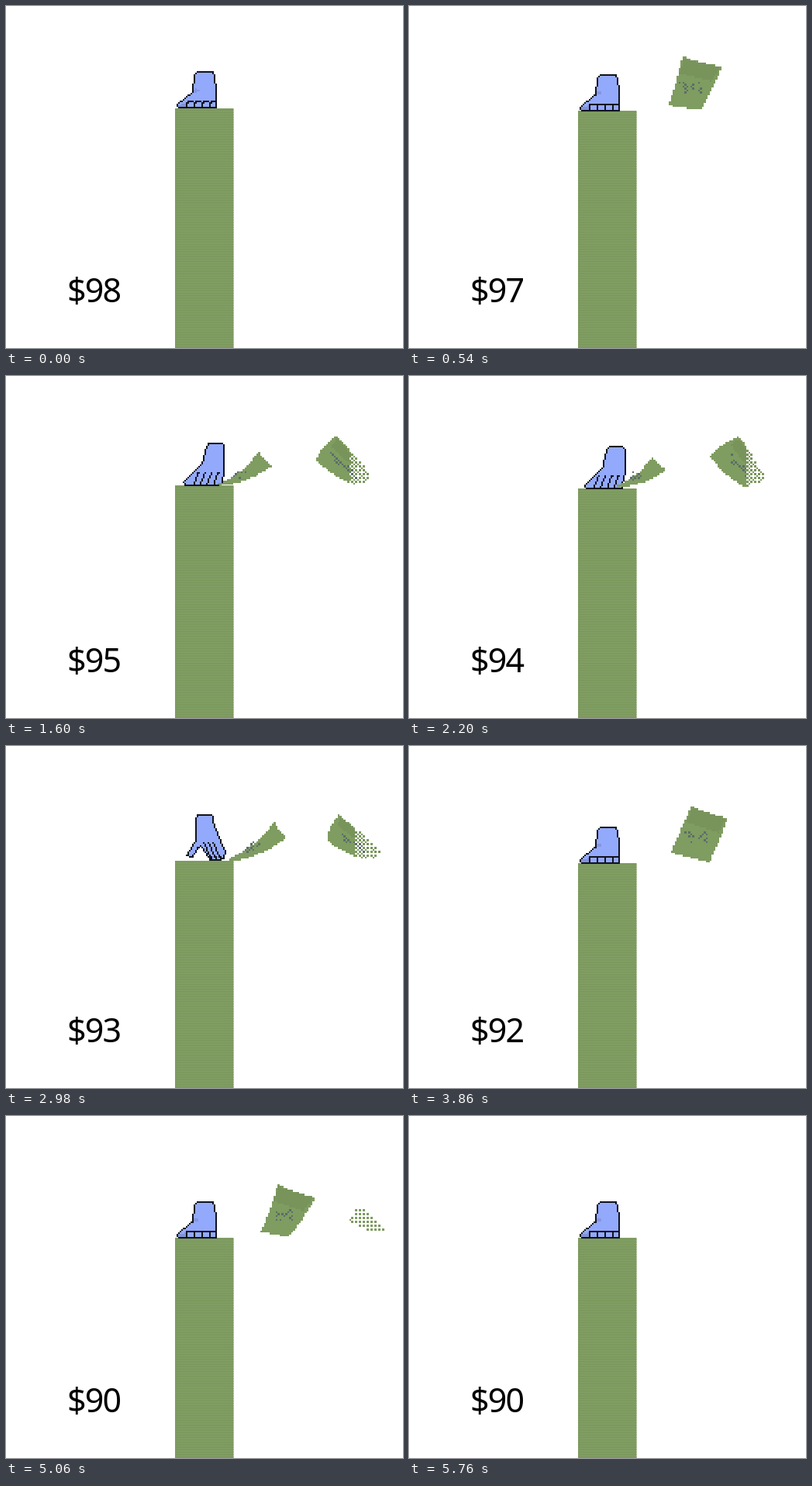
An HTML page with a canvas for the animation above (5.78 s loop, 512x441 px).

```html
<!DOCTYPE html>
<html lang="en">
<head>
<meta charset="utf-8">
<style>
html, body { margin: 0; width: 100%; height: 100%; overflow: hidden; background: #fff; }
canvas { display: block; }
</style>
</head>
<body>
<canvas id="stage" width="512" height="441"></canvas>
<script>
const ctx = document.getElementById('stage').getContext('2d');
const LOOP = 5780, CYCLE = 649, BILLS = 8, STEP = 3.15, TOP = 132;
const TAKE = 165; // moment in a cycle when a bill leaves the stack
const GONE = 1260; // age at which a bill has crumbled away
const GREEN = '#7f9c61', DARK = '#78945b', INK = '#5c6e68', BLUE = '#93a9fb', LINE = '#10131f';

const mix = (a, b, f) => a + (b - a) * f;
const clamp = (v, lo, hi) => Math.min(hi, Math.max(lo, v));

// Crisp cell painting: every shape is built from small squares.
function cell(i, j, s) {
  const x = Math.round(i * s), y = Math.round(j * s);
  ctx.fillRect(x, y, Math.round((i + 1) * s) - x, Math.round((j + 1) * s) - y);
}

function fillShape(pts, s, color, shown) {
  ctx.fillStyle = color;
  const ys = pts.map(p => p[1]);
  const last = Math.ceil(Math.max(...ys) / s);
  for (let j = Math.floor(Math.min(...ys) / s); j <= last; j++) {
    const y = (j + 0.5) * s, hits = [];
    pts.forEach((p, k) => {
      const q = pts[(k + 1) % pts.length];
      if ((p[1] <= y) !== (q[1] <= y)) hits.push(mix(p[0], q[0], (y - p[1]) / (q[1] - p[1])));
    });
    hits.sort((a, b) => a - b);
    for (let k = 0; k + 1 < hits.length; k += 2) {
      const end = Math.round(hits[k + 1] / s);
      for (let i = Math.round(hits[k] / s); i < end; i++) {
        if (!shown || shown(i, j)) cell(i, j, s);
      }
    }
  }
}

function strokeCells(pts, s, color, shown) {
  ctx.fillStyle = color;
  for (let k = 1; k < pts.length; k++) {
    const [a, b] = [pts[k - 1], pts[k]];
    const n = Math.ceil(Math.max(Math.abs(b[0] - a[0]), Math.abs(b[1] - a[1])) / s) || 1;
    for (let m = 0; m <= n; m++) {
      const i = Math.floor(mix(a[0], b[0], m / n) / s), j = Math.floor(mix(a[1], b[1], m / n) / s);
      if (!shown || shown(i, j)) cell(i, j, s);
    }
  }
}

// Pairs of numbers to points, moved by dx, dy.
function points(list, dx, dy) {
  const out = [];
  for (let k = 0; k < list.length; k += 2) out.push([list[k] + dx, list[k + 1] + dy]);
  return out;
}

// Hand poses: x on the stage, y from the top of the stack.
const REST = {
  body: [246,-47, 266,-47, 269,-43, 271,-20, 271,-1, 222,-1, 221,-5, 241,-21, 243,-43],
  x: 233, gap: 10, count: 4, slant: 0, rise: 8
};
const PRESS = {
  body: [258,-54, 275,-54, 278,-50, 278,-18, 274,-1, 228,-1, 226,-5, 250,-28, 255,-50],
  x: 245, gap: 8.5, count: 4, slant: -6, rise: 17
};
const PUSH = {
  body: [253,-54, 270,-54, 275,-38, 285,-3, 256,-1, 252,-11, 243,-1, 235,-3, 248,-20, 249,-50],
  x: 254, gap: 7, count: 4, slant: 4, rise: 18
};
const LIFT = {
  body: [248,-59, 266,-59, 269,-44, 283,-11, 280,-2, 264,-1, 252,-18, 248,-17, 239,-4, 233,-7, 246,-27, 245,-55],
  x: 256, gap: 6, count: 3, slant: 9, rise: 23
};

function poseAt(phase) {
  if (phase < 130 || phase >= 470) return [REST, 0, 0];
  if (phase < 305) return [PRESS, (phase - 253) * 0.07, 0];
  if (phase < 368) return [PUSH, (phase - 351) * 0.07, 0];
  const back = phase - 384;
  return [LIFT, -back * 0.14, -3 * Math.max(0, Math.sin(back / 86 * Math.PI))];
}

function drawHand(phase, top) {
  const [pose, dx, dy] = poseAt(phase);
  const base = top + dy, body = points(pose.body, dx, base);
  fillShape(body, 2, BLUE);
  if (pose === REST) {
    fillShape(points([244,-26, 250,-23, 240,-19], 0, top), 2, '#8596e2');
    fillShape(points([222,-4, 234,-7, 234,-1, 222,-1], 0, top), 2, '#8192d8');
  }
  strokeCells([...body, body[0]], 2, LINE);
  for (let k = 0; k < pose.count; k++) {
    const x = pose.x + k * pose.gap + dx, y = base - pose.rise;
    strokeCells([[x, y], [x + pose.slant, base - 2]], 2, LINE);
    if (pose === REST) strokeCells([[x + 1, y], [x + 4, y - 1], [x + 7, y - 1]], 2, LINE);
  }
}

// Bill poses: age, then four corners clockwise.
const FLIGHT = [
  [TAKE, 268,124, 286,128, 262,132, 256,131],
  [253, 313,94, 332,111, 270,134, 263,133],
  [384, 346,84, 361,106, 287,137, 286,133],
  [480, 346,67, 391,91, 345,134, 318,126],
  [586, 357,63, 413,67, 399,134, 346,129],
  [615, 364,61, 411,76, 387,134, 337,122],
  [700, 382,60, 427,85, 399,139, 348,116],
  [902, 425,71, 460,125, 434,137, 388,97],
  [1000, 426,77, 485,129, 466,137, 411,112],
  [GONE, 480,113, 498,131, 477,125, 465,118]
];

function cornersAt(age) {
  const t = age < 1000 ? age : Math.max(1000, age - 20);
  let k = 1;
  while (k < FLIGHT.length - 1 && FLIGHT[k][0] < t) k++;
  const [a, b] = [FLIGHT[k - 1], FLIGHT[k]];
  const f = clamp((t - a[0]) / (b[0] - a[0]), 0, 1);
  return a.slice(1).map((v, n) => mix(v, b[n + 1], f));
}

// Outward bend of the four edges.
function bends(age) {
  if (age < 586) {
    const curl = clamp((586 - age) / 200, 0, 1);
    return [-2, 5 * curl, 0, -6 * curl];
  }
  const f = clamp((age - 615) / 300, 0, 1), thin = clamp((GONE - age) / 200, 0, 1);
  return [mix(-3, 1, f) * thin, thin, 4 * f * thin, 3 * f * thin];
}

// Left border of the crumbling part.
function borderAt(age) {
  if (age < 902) return 434 + (902 - age) * 0.57;
  return age < 1045 ? Math.min(448, 434 + (age - 902) * 0.143) : Math.max(420, 448 - (age - 1045) * 0.18);
}

// Ordered threshold of a 4 by 4 tile, 0 to 1.
function threshold(i, j) {
  const order = (x, y) => 2 * (x ^ y) + y;
  return (4 * order(i & 1, j & 1) + order(i >> 1 & 1, j >> 1 & 1)) / 16;
}

function drawBill(age, dy) {
  const s = 2.5, c = points(cornersAt(age), 0, dy), bend = bends(age), outline = [];
  c.forEach((p, k) => {
    const q = c[(k + 1) % 4];
    const dx = q[0] - p[0], ey = q[1] - p[1], len = Math.hypot(dx, ey) || 1;
    for (let m = 0; m < 6; m++) {
      const f = m / 6, h = 4 * f * (1 - f) * bend[k];
      outline.push([p[0] + dx * f + ey / len * h, p[1] + ey * f - dx / len * h]);
    }
  });
  const border = age > 830 ? borderAt(age) : 999;
  const shown = (i, j) => {
    const d = i * s - border;
    return d < 0 || threshold(i, j) < Math.max(0.2, 0.52 - d * 0.011);
  };
  const at = (x, y) => [0, 1].map(n => mix(mix(c[0][n], c[1][n], x), mix(c[3][n], c[2][n], x), y));
  fillShape(outline, s, GREEN, shown);
  if (age > 450 && age < 1100) {
    fillShape([at(0.04, 0.03), at(0.96, 0.03), at(0.93, 0.36), at(0.05, 0.34)], s, DARK, shown);
  }
  if (age > 240 && age < 1060) {
    const dots = (i, j) => (i + j) % 2 === 0 && shown(i, j);
    const mark = [];
    for (let x = 0; x <= 1; x += 0.125) {
      mark.push(at(0.22 + 0.56 * x, 0.56 + 0.13 * Math.sin(x * 7.6 - 0.6)));
    }
    strokeCells(mark, s, INK, dots);
    strokeCells([at(0.15, 0.52), at(0.85, 0.62)], s, INK, dots);
  }
}

function drawStack(top) {
  ctx.fillStyle = '#819e64';
  ctx.fillRect(218, top, 75.5, 441 - top);
  ctx.fillStyle = '#7b985c';
  for (let y = TOP + 1.5; y < 441; y += STEP) {
    if (y >= top) ctx.fillRect(218, y, 75.5, 1.4);
  }
}

function draw(t) {
  ctx.fillStyle = '#fff';
  ctx.fillRect(0, 0, 512, 441);

  const turn = Math.floor(t / CYCLE), phase = t - turn * CYCLE;
  const taken = Math.min(BILLS, turn + (phase >= TAKE ? 1 : 0));
  const top = Math.round(TOP + taken * STEP);

  drawStack(top);
  drawHand(turn < BILLS ? phase : 0, top);
  for (let k = 0; k < BILLS; k++) {
    const age = t - k * CYCLE;
    if (age >= TAKE && age < GONE && t < 5755) drawBill(age, k * STEP);
  }

  ctx.fillStyle = '#000';
  ctx.font = '43px "Noto Sans", "Open Sans", sans-serif';
  ctx.letterSpacing = '-1.8px';
  ctx.fillText('$' + (98 - taken), 79, 382);
}

const start = performance.now();
function tick() {
  draw((performance.now() - start) % LOOP);
  requestAnimationFrame(tick);
}
tick();
</script>
</body>
</html>
```
